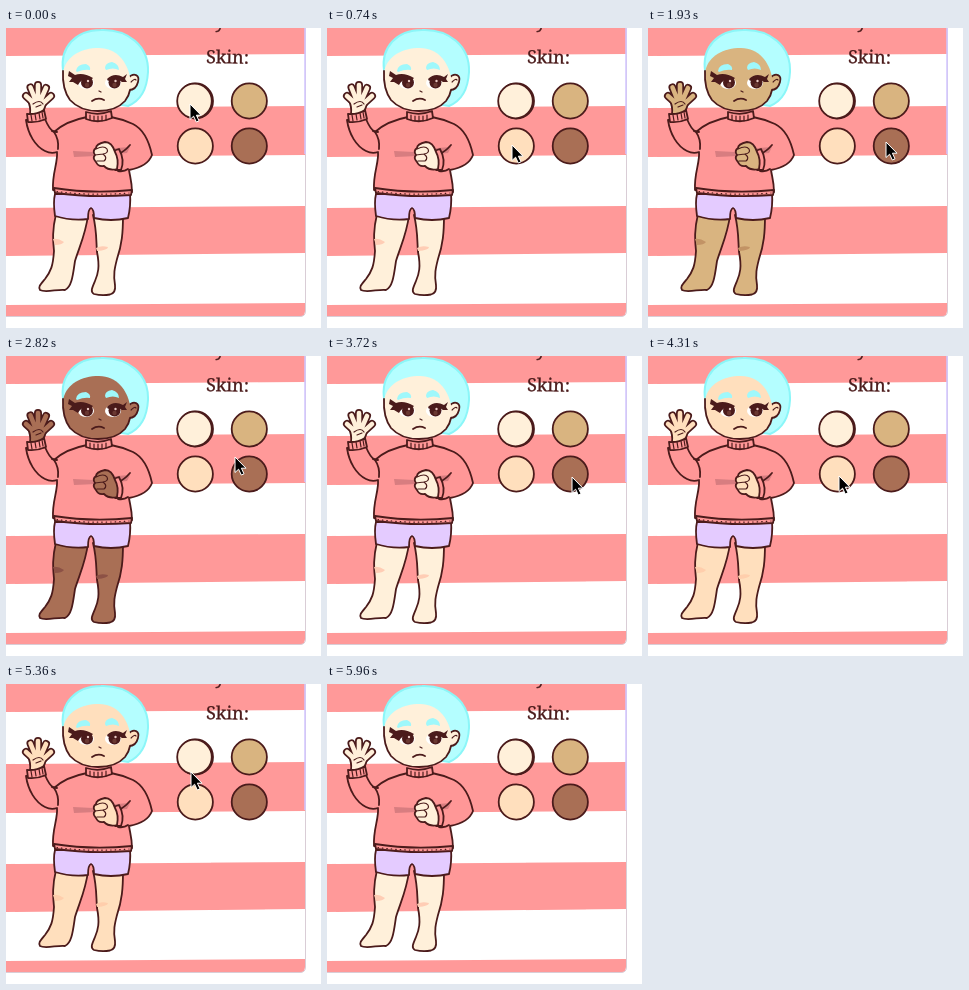
Animation of 315 by 300 pixels, one loop 6.13 s. Source, as an HTML page:

```html
<!DOCTYPE html>
<html lang="en">
<head>
<meta charset="utf-8">
<title>Skin picker</title>
<style>
  html, body { margin: 0; width: 100%; height: 100%; overflow: hidden; background: #fff; }
  svg { display: block; width: 315px; height: 300px; }
  .ink { stroke: #4b1b1b; stroke-width: 1.8; stroke-linecap: round; stroke-linejoin: round; }
  .line { fill: none; }
  .thin { stroke-width: 1.2; }
  .skin { fill: var(--skin); }
  .knit { fill: #ff9797; }
  .dark { fill: #4b1b1b; }
  .mark { fill: var(--mark); }
  .finger { fill: none; stroke-linecap: round; }
  text { font: 18px "Noto Serif", serif; fill: #4b1b1b; stroke: #4b1b1b; stroke-width: .3; }
</style>
</head>
<body>
<svg viewBox="0 0 315 300">
  <defs>
    <clipPath id="panel"><path d="M0 0H299V283q0 5.500-5.500 5.500H0Z"/></clipPath>
    <path id="fingers" d="M30 77L20 68M31 76L24.500 59.500M32 76V57M33 76L40 60M34 78L45 68"/>
  </defs>

  <g clip-path="url(#panel)" fill="#ff9999">
    <path d="M0 0H300V26L0 28ZM0 80L300 78V127L0 129ZM0 180L300 178V225L0 228ZM0 277L300 275V290H0Z"/>
  </g>
  <path d="M299.500 0V283q0 5.500-5.500 5.500H0" fill="none" stroke="#d9cdd6"/>
  <path d="M299 0V126" stroke="#d0c4ff" stroke-width="1.500"/>

  <text x="209" y="0">y</text>
  <text x="200" y="35" transform="rotate(1 200 35)">Skin:</text>
  <g id="swatches" class="ink"></g>

  <!-- legs and shorts -->
  <path class="ink skin" d="M50 186C46 203 47 212 48 223C47 238 45 243 39 251C34 257 32 259 34 262C39 265 52 261 59 262C66 259 67 246 69 233C74 217 80 205 82 187Z"/>
  <path class="ink skin" d="M87 187C91 203 90 213 91 224C94 239 92 246 89 253C86 260 84 264 88 266Q96 268 104 266.500Q110 265 109 257C107 246 109 239 111 231C116 216 117 205 117 187Z"/>
  <path class="mark" d="M47 211q5-1 11 3q-2 3-9 3ZM90 220q5-3 12-1q0 3-11 4Z"/>
  <path class="ink" fill="#e4cbff" d="M49 166C47 174 48 181 49 188Q65 193 82 191Q82 181 85 180Q88 181 88 190Q105 194 122 190Q125 178 124 165Z"/>

  <!-- raised hand -->
  <use href="#fingers" class="finger" stroke="#4b1b1b" stroke-width="8"/>
  <path class="ink skin" d="M24 86Q25 79 22 73Q30 65 41 73Q39 80 36 86Z"/>
  <use href="#fingers" class="finger" stroke="var(--skin)" stroke-width="4.600"/>
  <path class="ink line thin" d="M27 76Q34 71 37 76M30 79l5-2"/>

  <!-- sweater -->
  <path class="ink knit" d="M20 92C22 106 29 118 39 123Q45 126 51 124C52 135 46 145 47 162Q85 168 126 164C126 154 124 149 123 142C134 140 143 135 146 127C143 113 137 101 127 96Q116 91 105 89L81 89Q60 93 48 104Q43 101 39 91Z"/>
  <path class="ink knit" d="M21 86Q30 87 38 82L40 91Q31 95 22 94Z"/>
  <path class="ink line thin" d="M25 87l1 6M29 86l1 6M33 85l1 6M36 84l1 6"/>
  <path class="ink line" d="M48 104Q53 111 52 121M46 103l5 1"/>
  <path class="ink knit" d="M48 160Q85 166 126 162L125 167Q85 170 49 165Z"/>
  <path class="ink line thin" stroke-dasharray=".5 4" d="M51 163.500Q85 168 123 165"/>
  <path class="ink knit" d="M80 84Q93 88 105 83L106 90Q93 96 80 91Z"/>
  <path class="ink line thin" d="M84 87v5M88 88v5M92 88v5M96 88v5M100 87v5"/>

  <!-- folded arm and fist -->
  <path fill="#d87d80" d="M67 123L87 124L110 120L124 119L121 125L91 128L68 129Z"/>
  <path class="ink line" d="M112 126Q118 124 124 117M122 141Q118 144 112 143"/>
  <path class="ink knit" d="M107 123L113 121Q119 132 115 142L109 142Z"/>
  <path class="ink skin" d="M109 124Q106 114 99 114Q90 116 90 120Q86 123 89 127Q86 130 90 134Q92 139 98 138Q103 143 111 141Q113 131 109 124Z"/>
  <path class="ink line thin" d="M90 121Q98 117 101 121Q103 125 97 126L89 127M97 126Q102 130 98 133L91 133"/>

  <!-- head -->
  <path fill="#b4feff" stroke="#8bf6f8" stroke-width="2" d="M57 42C54 20 69 2 95 2C122 1 143 18 142 44C141 63 134 73 122 78L67 69Z"/>
  <path class="ink skin" d="M122 50C128 44 134 47 132 54Q130 62 123 62Z"/>
  <path class="ink line thin" d="M125 54q4-4 5-2"/>
  <path class="skin" d="M57.500 42C61 28 75 20 93 20C111 20 121 34 124 49Q126 63 119 73Q110 83 92 83Q73 82 64 72Q56 59 57.500 42Z"/>
  <path class="ink line" d="M57 43Q56 61 64 72Q74 83 92 83Q110 83 119 73Q123 68 124 62"/>
  <path fill="#9ff8fb" d="M70 43Q71 36 80 36Q85 38 84 42Q78 41 71 44ZM99 40Q99 35 106 34Q113 36 113 42Q107 39 100 42Z"/>
  <g id="eyes"></g>
  <path class="dark" d="M63 43L69 47Q77 44 87 50L85 52Q76 49 72 57L67 54L63 54L66 50L62 48ZM101 51Q108 44 117 49L121 46L119 51L121 54L116 54Q109 48 102 53Z"/>
  <path class="ink line" d="M86 73Q92 69 98 72"/>
  <path class="ink line thin" d="M93 63l2 1"/>

  <path id="cursor" fill="#000" stroke="#fff" d="M0 0V15.500L3.600 12.200L6.300 18L9 16.800L6.400 11.200H11Z"/>
</svg>

<script>
const LOOP = 6130;
const tones = {
  light: ["#fff0da", "#ffcdb5"],
  peach: ["#ffdfbd", "#ffceac"],
  tan: ["#d9b480", "#c29365"],
  brown: ["#a96f55", "#8c5145"]
};

// start time, tone, pointer x and y; no position hides the pointer
const steps = [
  [0, "light", 184, 76], [590, "light", 185, 96], [740, "light", 185, 117], [890, "peach", 185, 118],
  [1180, "peach", 205, 104], [1330, "peach", 234, 83], [1480, "tan", 235, 76],
  [1780, "tan", 237, 95], [1930, "tan", 238, 114], [2080, "brown", 238, 116],
  [2820, "brown", 229, 101], [2970, "brown", 196, 79], [3120, "light", 186, 75], [3270, "light", 192, 81],
  [3420, "light", 212, 97], [3570, "light", 235, 115], [3720, "light", 245, 121],
  [3870, "brown", 245, 121], [4020, "brown", 225, 121], [4170, "brown", 198, 120], [4310, "peach", 191, 120],
  [4460, "peach", 187, 100], [4610, "light", 185, 79], [4760, "light", 185, 100], [4910, "light", 185, 123],
  [5060, "peach", 185, 123], [5210, "peach", 185, 110], [5360, "peach", 185, 88],
  [5510, "light", 184, 77], [5660, "light", 184, 76], [5810, "light", 184, 76], [5960, "light"]
];

const byId = id => document.getElementById(id);
const circle = (x, y, r, fill) => `<circle cx="${x}" cy="${y}" r="${r}" fill="${fill}"/>`;

byId("swatches").innerHTML =
  circle(189.5, 73, 17.5, "#4b1b1b") + circle(188.5, 73, 17.3, tones.light[0]) +
  circle(243.3, 73, 17.6, tones.tan[0]) +
  circle(189.3, 118, 17.6, tones.peach[0]) + circle(243.3, 118, 17.6, tones.brown[0]);

byId("eyes").innerHTML = [[80, 81], [107, 108.5]].map(([white, iris]) =>
  `<ellipse cx="${white}" cy="55" rx="8" ry="6" fill="#fff"/>` +
  circle(iris, 54.5, 6, "#4b1b1b") + circle(iris, 57, 2.2, "#693832") + circle(iris + 1, 53, 1.2, "#e9c9c4")
).join("");

const root = document.documentElement.style;
const cursor = byId("cursor");

function draw() {
  const time = performance.now() % LOOP;
  const [, tone, x = -99, y = -99] = steps.findLast(step => step[0] <= time);
  const [skin, mark] = tones[tone];
  root.setProperty("--skin", skin);
  root.setProperty("--mark", mark);
  cursor.setAttribute("transform", `translate(${x} ${y})`);
  requestAnimationFrame(draw);
}
draw();
</script>
</body>
</html>
```
